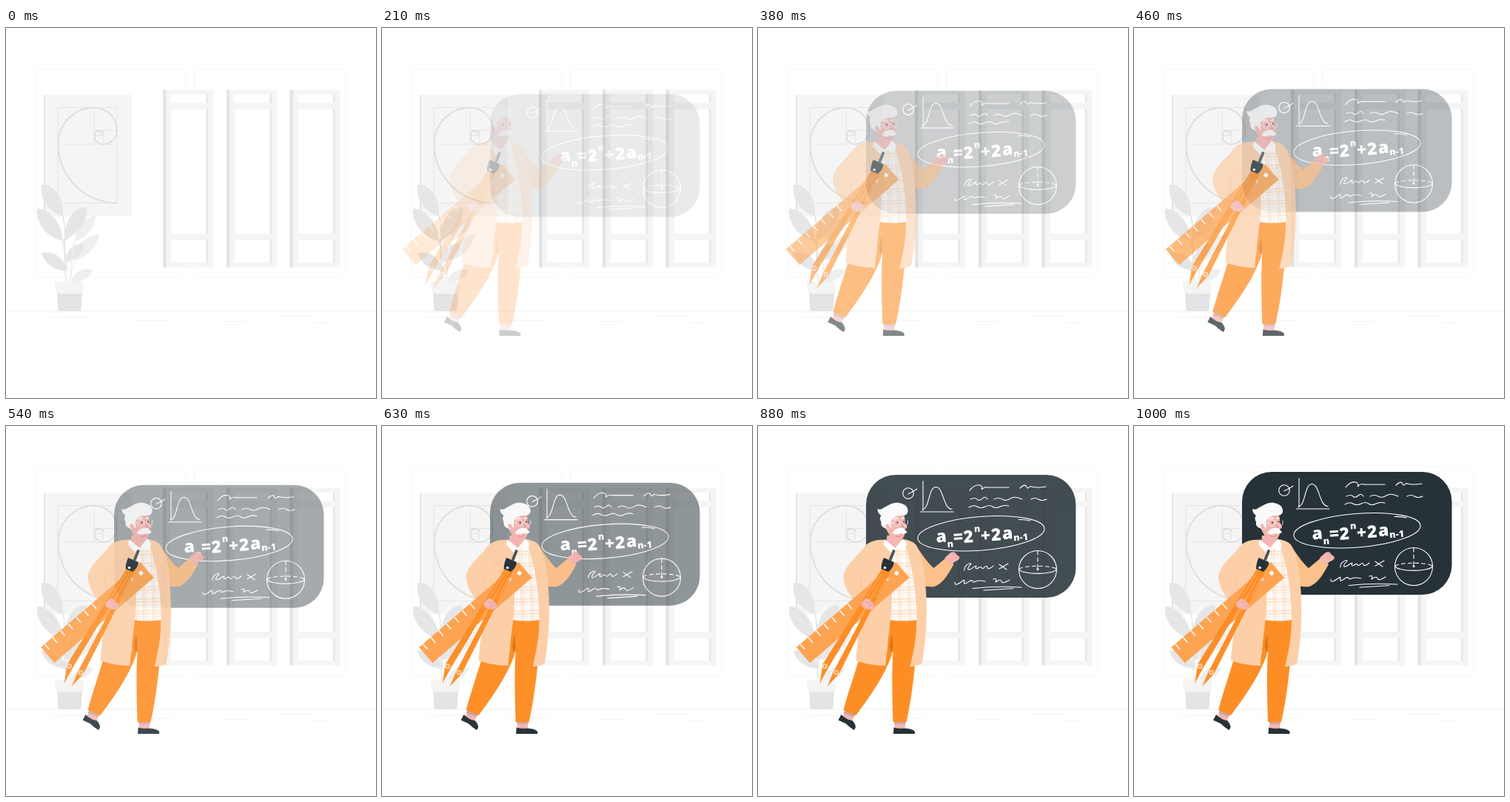
These frames come from a looping animation (500x500 px, 1040 ms). An HTML page:

```html
<!DOCTYPE html>
<html lang="en">
<head>
<meta charset="utf-8">
<title>Maths lesson</title>
<style>
  html, body { margin: 0; width: 100%; height: 100%; overflow: hidden; background: #fff; }
  svg { display: block; width: 100%; height: 100%; }
  .line { fill: none; stroke-linecap: round; stroke-linejoin: round; }
  .chalk { stroke: #fff; stroke-width: 1.1; }
  .formula { font: 800 23px "Open Sans", "Noto Sans", sans-serif; fill: #fff; }
  .small { font-size: 12.5px; }
  .coat { fill: #fdcfa8; }
  .orange { fill: #fd8e26; }
  .skin { fill: #f5b5b0; }
  .dark { fill: #263238; }
  .hair { fill: #fafafa; }
  #board, #man { opacity: 0; }
</style>
</head>
<body>
<svg viewBox="0 0 500 500">
  <defs>
    <g id="window">
      <path fill="#f5f5f5" d="M4 0H68V240H4Z"/>
      <path fill="#e4e4e4" d="M0 0H4.500V240H0Z"/>
      <path fill="#e6e6e6" d="M11 6H61V18H11ZM11 26H61V194.500H11ZM11 203H61V234H11Z"/>
      <path fill="#fff" d="M11 6H58.500V18H11ZM11 26H58.500V194.500H11ZM11 203H58.500V234H11Z"/>
    </g>
    <pattern id="plaid" width="13" height="16" patternUnits="userSpaceOnUse" patternTransform="translate(183 164) rotate(-2)">
      <path fill="#fff" d="M0 0H13V16H0Z"/>
      <path class="line" stroke="#fddcbf" stroke-width="1.300" d="M3 0V16M6 0V16M0 6H13M0 10H13"/>
      <path class="line" stroke="#fbe9da" stroke-width="1" d="M10 0V16M0 14H13"/>
    </pattern>
  </defs>

  <!-- room -->
  <g class="line" stroke="#f7f7f7" stroke-width="1">
    <rect x="39.500" y="55.500" width="203" height="282" rx="3"/>
    <rect x="254.500" y="55.500" width="204" height="282" rx="3"/>
  </g>
  <path stroke="#f0f0f0" d="M0 382.500H500"/>
  <path class="line" stroke="#f2f2f2" stroke-width="1.200" d="M53 391H63M72 391H112M171 395H224M294 396.500H323M368 389.500H416M417 398.500H436"/>
  <use href="#window" x="212" y="83.500"/>
  <use href="#window" x="298" y="83.500"/>
  <use href="#window" x="383.500" y="83.500"/>

  <!-- spiral poster -->
  <path fill="#f5f5f5" d="M52 90.500H170V254.500H52Z"/>
  <path fill="#e4e4e4" d="M51 90.500H53V254.500H51Z"/>
  <path class="line" stroke="#dedede" stroke-width=".7" d="M70.500 107.500H150V236.500H70.500ZM70.500 157H150M119.500 107.500V157M119.500 138.500H150M131.300 138.500V157M119.500 145.500H131.300M126.500 138.500V145.500"/>
  <path class="line" stroke="#dedede" stroke-width="1.900" d="M150 236.500A79.500 79.500 0 0 1 70.500 157A49 49.500 0 0 1 119.500 107.500A30.500 31 0 0 1 150 138.500A18.700 18.500 0 0 1 131.300 157A11.800 11.500 0 0 1 119.500 145.500A7 7 0 0 1 126.500 138.500A4.500 4.500 0 0 1 131 143"/>

  <!-- plant -->
  <g fill="#efefef">
    <path d="M94 314C92 293 108 283 125 278C125 292 112 308 94 314Z"/>
    <path d="M93 288C94 268 106 256 121 253C121 268 108 284 93 288Z"/>
    <path d="M88 343C92 328 106 323 118 327C114 338 101 344 88 343Z"/>
  </g>
  <g fill="#e6e6e6">
    <path d="M77 255C55 247 45 228 48 212C65 210 79 231 77 255Z"/>
    <path d="M77 288C53 282 40 262 42 244C60 243 77 267 77 288Z"/>
    <path d="M79 287C78 260 92 242 109 242C111 262 97 279 79 287Z"/>
    <path d="M82 328C62 327 51 316 48 304C63 300 80 311 82 328Z"/>
    <path d="M82 316C80 300 92 290 105 292C105 305 95 314 82 316Z"/>
  </g>
  <g class="line" stroke="#e6e6e6" stroke-width="1.500">
    <path d="M77 253C84 285 75 310 82 345M79 286C77 300 82 312 82 328M77 287C80 300 81 308 82 316"/>
    <path stroke="#efefef" d="M94 313C89 324 87 334 86 345M93 288C88 306 88 322 87 345"/>
  </g>
  <path fill="#f4f4f4" d="M67 343H104Q106 343 105 346L104 359H68L66 346Q65 343 67 343Z"/>
  <path fill="#e4e4e4" d="M69 359H103L101.500 380Q101 382.500 99 382.500H73Q71 382.500 70.500 380Z"/>

  <g id="board">
    <rect class="dark" x="146" y="62" width="283.500" height="166" rx="40"/>
    <g class="line chalk">
      <circle cx="203" cy="87" r="7.300"/>
      <path d="M203 88Q205 86 207 86L215 81"/>
      <path d="M223 70.500V110M219.500 112H264M222 109C232 108 230 78.500 240.500 78.500C251 78.500 250 108 262 108.500"/>
      <path d="M286 83Q293 74 300 76C306 78 300 83 303 81C308 76 310 80 314 79H339M354 80C359 75 363 75 363 79C365 82 367 76 370 78Q376 80 389 78"/>
      <path d="M287 95Q293 92 296 95T303 94T310 95M319 95Q325 92 330 95T341 94T357 95M369 95Q374 92 379 95T390 95"/>
      <path d="M285 106Q291 102 296 105T307 105T317 105T327 105T339 104"/>
      <path d="M352 122.500Q361 122 368 124"/>
      <ellipse cx="301.500" cy="141.200" rx="85.800" ry="22.800" transform="rotate(-4.500 301.500 141.200)"/>
      <path d="M279 191C278 186 285 180 288 182C287 184 282 188 284 190C288 191 292 185 295 185C293 189 295 190 299 187C302 184 301 190 305 188Q309 183 310 187T318 185M326 183L336 190M338 182L326 189"/>
      <path d="M266 207C265 213 272 209 277 205C282 202 276 210 280 209C285 207 287 203 290 205Q290 208 294 206T307 206M318 203Q324 201 321 207Q328 202 329 206T340 204"/>
      <path d="M290 215.500Q322 212 356 214M305 218L345 215.500"/>
      <circle cx="378" cy="190" r="25.500"/>
      <path d="M352.500 189C355 197.500 401 197.500 403.500 189"/>
      <path stroke-dasharray="5 4" d="M378 165V188M353 189C360 184 396 184 403 189"/>
      <circle cx="378" cy="189.500" r="1"/>
    </g>
    <text class="formula" transform="translate(241 153.500) rotate(-4)"><tspan x="0" y="0">a</tspan><tspan class="small" x="14.500" y="7.500">n</tspan><tspan x="23.500" y="2">=</tspan><tspan x="37" y="3">2</tspan><tspan class="small" x="52" y="-10.500">n</tspan><tspan x="60.500" y="3">+</tspan><tspan x="74.500" y="3">2</tspan><tspan x="89.500" y="2">a</tspan><tspan class="small" x="104.500" y="5">n-1</tspan></text>
  </g>

  <g id="man">
    <!-- legs and shoes -->
    <path class="skin" d="M117 385L130 390L124 401L112 394ZM183 398H198L197 410H183Z"/>
    <path fill="#c9a6a2" d="M116 384L130 389L128 393L114 388ZM182.500 399H198V402.500H183Z"/>
    <path class="dark" d="M111 390Q118 397 126 398Q130 402 130.500 407L128.500 411Q122 407 117 402L107 397.500ZM182 407.500Q189 409.500 197 408.500Q208 409 210.500 413V416H181.500Z"/>
    <path class="orange" d="M138 305L180 308C168 341 149 366 131 391L114 384C120 361 129 336 138 305Z"/>
    <path class="orange" d="M176 260L213 262C214 310 207 365 199 400H181C180 365 179 335 181 305L172 316Z"/>
    <path fill="#d9751a" d="M180 282C176 291 176 299 178 306L181 301Z"/>

    <!-- shirt and coat -->
    <path fill="url(#plaid)" d="M172 160L196 153C209 190 214 222 214 262Q195 265 176 262Z"/>
    <path class="skin" d="M173 148H193L192 157L184 165L172 156Z"/>
    <path class="coat" d="M170 154C156 153 147 157 141 165C131 178 117 187 114 203C114 219 125 234 139 246C137 270 132 293 131 317Q150 324 171 324C172 300 176 280 178 257L181 195C181 178 177 164 170 154Z"/>
    <path fill="#fcc08a" d="M211 160C223 178 230 187 236 192L254 177L263 187C256 200 248 213 237 217Q231 218 222 216L210 190Z"/>
    <path class="coat" d="M195 153C208 155 212 159 215 166C222 182 224 200 225 216C228 255 226 287 220 321Q213 325 204 325C211 297 213 278 213 260C212 222 208 190 195 153Z"/>
    <path class="line" stroke="#f2bd92" stroke-width=".8" d="M166 178C153 188 144 195 137 206Q137 220 146 230"/>
    <path fill="#fff" d="M170 153L184 165L177 170L168 160ZM194 152L200 159L197 167L184 165Z"/>

    <!-- raised hand -->
    <path class="skin" d="M251 178L259 171Q265 169 266 173L271 177Q271 181 265 183L260 187Q254 186 251 178Z"/>
    <path class="line" stroke="#e39c98" stroke-width=".7" d="M260 174L266 173M263 178L270 177"/>

    <!-- ruler -->
    <g transform="translate(50.500 299) rotate(-40.600)">
      <rect fill="#fda452" width="177" height="28"/>
      <path stroke="#fff" stroke-width="9" stroke-dasharray="1.500 12.500" d="M6 5H94"/>
      <circle cx="168" cy="12" r="2.800" fill="#fff"/>
      <path fill="#fff" opacity=".7" d="M151 8L156 10L152 13Z"/>
    </g>

    <!-- compass -->
    <path class="orange" d="M166 193L172 196L94 326L82 348L86 322ZM173 194L178 196L108 335L92 352L101 331Z"/>
    <path class="line" stroke="#fdb272" stroke-width="1" d="M165 200L146 231M172 205L158 232"/>
    <g fill="#fd9d48" stroke="#fde0c6" stroke-width="1.300">
      <circle cx="89" cy="324.500" r="2.700"/>
      <circle cx="104.500" cy="333" r="2.700"/>
    </g>
    <path class="line" stroke="#4b555a" stroke-width="3.800" d="M177.500 180L182 169"/>
    <path class="dark" d="M168.500 178L182.500 184Q181.500 192 174.500 197L165 193Q165 186 168.500 178Z"/>
    <circle cx="170" cy="191.500" r="1.800" fill="#fff"/>

    <!-- holding hand -->
    <path class="skin" d="M138 239L144 233Q149 233 151 236L156 242Q156 247 150 248Q143 248 138 243Z"/>
    <path class="line" stroke="#e39c98" stroke-width=".7" d="M146 239L152 238M148 243L155 242"/>

    <!-- head -->
    <path class="skin" d="M174 121L194 119Q198 124 197 130L200 136Q200 139 197 139Q198 150 192 153Q184 157 178 151L172 140Z"/>
    <path class="hair" d="M160 112Q165 114 169 110C176 107 178 104 187 103.500Q200 105 201 113Q202 119 196 121L191 121Q184 121 180 126Q177 130 179 136Q176 142 170 138Q164 136 165 130Q162 124 165 121Q160 118 160 112Z"/>
    <path class="skin" d="M175 133Q170 131 171 136Q173 141 178 139Z"/>
    <path class="hair" d="M189 138Q194 136 197 140L200 143Q198 147 191 145Q186 148 180 145Q183 139 189 138Z"/>
    <path class="line" stroke="#c97f7c" stroke-width=".8" d="M185 149Q189 151 193 148M192 130L195 136L192 137"/>
    <path class="line" stroke="#fff" stroke-width="1.500" d="M182 126Q185 123 188 125M193 125L196 124"/>
    <g class="line" stroke="#f7f2f0" stroke-width=".9">
      <circle cx="186" cy="131" r="4.500"/>
      <path d="M181.500 131L173 131M190.500 130H194M201 128Q202 134 198 135Q194 135 194 130"/>
    </g>
    <circle class="dark" cx="187" cy="130.500" r="1.100"/>
    <circle class="dark" cx="195.500" cy="129.500" r="1.100"/>
  </g>
</svg>
<script>
  const LOOP = 1040, FPS = 24, HOLD = 3, SHIFT = 30;
  const board = document.getElementById("board");
  const man = document.getElementById("man");

  const cubic = (a, b, u) => 3 * (1 - u) ** 2 * u * a + 3 * (1 - u) * u * u * b + u ** 3;

  function bezier(x1, y1, x2, y2) {
    return x => {
      if (x <= 0 || x >= 1) return x <= 0 ? 0 : 1;
      let lo = 0, hi = 1;
      for (let i = 0; i < 24; i++) {
        const mid = (lo + hi) / 2;
        if (cubic(x1, x2, mid) < x) lo = mid; else hi = mid;
      }
      return cubic(y1, y2, lo);
    };
  }

  const easeIn = bezier(.42, 0, 1, 1);
  const overshoot = bezier(.36, -.01, .5, 1.38);

  function place(el, p, dx, dy) {
    const off = 1 - p;
    el.style.opacity = Math.min(1, Math.max(0, p));
    el.setAttribute("transform", `translate(${dx * off} ${dy * off})`);
  }

  // The motion advances in 24 steps per second after a short hold;
  // the small lead absorbs step times rounded to 10 ms.
  function draw(ms) {
    const step = Math.floor((ms % LOOP) * FPS / 1000 + .1);
    const x = step < HOLD ? 0 : (step + 1) / FPS;
    place(board, easeIn(x), 0, SHIFT);
    place(man, overshoot(x), -SHIFT, 0);
  }

  const start = performance.now();
  function tick() {
    draw(performance.now() - start);
    requestAnimationFrame(tick);
  }
  tick();
</script>
</body>
</html>
```
